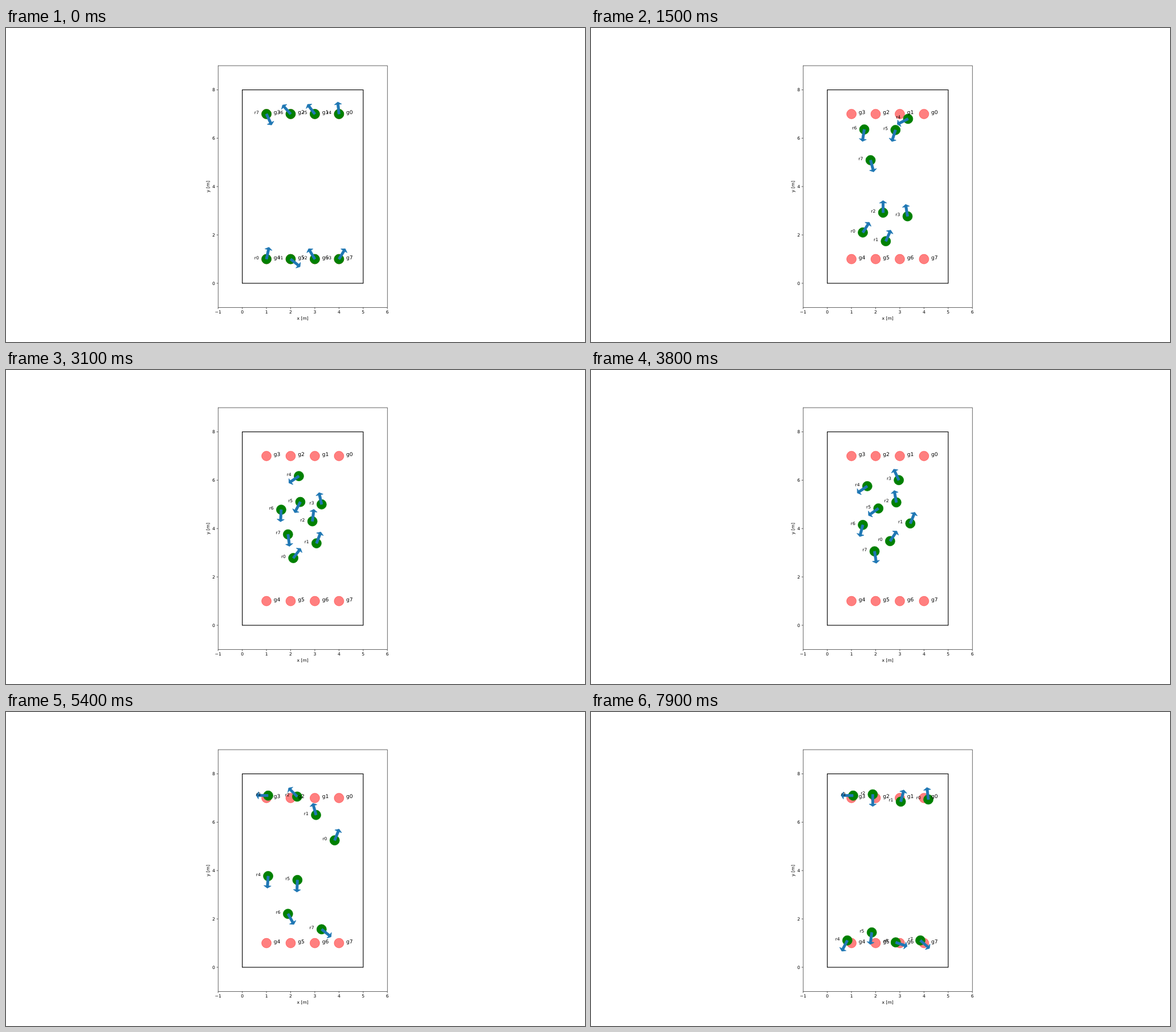
Animation, 1016 px wide and 551 px high, one loop 8 s. Source, as an HTML page:

```html
<!DOCTYPE html>
<html lang="en">
<head>
<meta charset="utf-8">
<title>Robot swap</title>
<style>
  html, body { margin: 0; width: 100%; height: 100%; overflow: hidden; background: #fff; }
  svg { display: block; width: 100%; height: 100%; }
  text { font: 7.63px "DejaVu Sans", sans-serif; text-rendering: geometricPrecision; }
  .goal { font-size: 9.15px; }
</style>
</head>
<body>
<svg id="stage" viewBox="0 0 1016 551"></svg>
<script>
const stage = document.getElementById('stage');
const UNIT = 42.43, RADIUS = 0.2 * UNIT, THIN = 0.61, EDGE = 0.76;
const STEP = 100, LOOP = 8000;
const px = x => 414.63 + UNIT * x;
const py = y => 447.96 - UNIT * y;
const rad = deg => deg * Math.PI / 180;
const ease = u => { u = Math.min(1, Math.max(0, u)); return u * u * (3 - 2 * u); };

function add(tag, attrs, parent = stage) {
  const el = document.createElementNS('http://www.w3.org/2000/svg', tag);
  for (const k in attrs) el.setAttribute(k, attrs[k]);
  return parent.appendChild(el);
}
function label(str, x, y, attrs = {}) {
  const el = add('text', { x, y, ...attrs });
  el.textContent = str;
  return el;
}
const line = (x1, y1, x2, y2) =>
  add('line', { x1, y1, x2, y2, stroke: '#000', 'stroke-width': THIN });
const box = (x0, y0, x1, y1, width) => add('rect', {
  x: px(x0), y: py(y1), width: UNIT * (x1 - x0), height: UNIT * (y1 - y0),
  fill: 'none', stroke: '#000', 'stroke-width': width
});

// Each robot: first and last heading in degrees, and waypoints in metres.
// The start and the goal places follow from the index.
const times = [0, 1500, 3100, 4400, 5400, 7900];
const CRUISE = 0.0012, TURN = 1000;
const home = i => i < 4 ? { x: 1 + i, y: 1 } : { x: 8 - i, y: 7 };
const robots = [
  { turn: [78, 97], via: [[1.47, 2.1], [2.11, 2.78], [3.07, 4.18], [3.82, 5.25], [4.18, 6.94]] },
  { turn: [-39, 75], via: [[2.42, 1.74], [3.07, 3.39], [3.61, 4.96], [3.05, 6.3], [3.04, 6.85]] },
  { turn: [121, 270], via: [[2.31, 2.92], [2.9, 4.3], [2.7, 5.81], [2.27, 7.06], [1.88, 7.15]] },
  { turn: [59, 179], via: [[3.32, 2.77], [3.28, 5], [2.48, 6.72], [1.07, 7.1]] },
  { turn: [96, 241], via: [[3.34, 6.8], [2.34, 6.17], [1.14, 5.24], [1.07, 3.77], [0.83, 1.11]] },
  { turn: [127, 263], via: [[2.82, 6.34], [2.4, 5.1], [1.95, 4.58], [2.28, 3.61], [1.84, 1.44]] },
  { turn: [132, 341], via: [[1.53, 6.36], [1.61, 4.78], [1.41, 3.56], [1.89, 2.21], [2.83, 1.03]] },
  { turn: [295, 319], via: [[1.79, 5.09], [1.89, 3.76], [2.16, 2.45], [3.28, 1.57], [3.85, 1.11]] }
];

// Velocity along a heading; none while the robot faces away from its path
function launch(knot, deg, p, q) {
  const dx = (q.x - p.x) / (q.t - p.t), dy = (q.y - p.y) / (q.t - p.t);
  const c = Math.cos(rad(deg)), s = Math.sin(rad(deg));
  const v = Math.max(0, dx * c + dy * s);
  knot.vx = v * c;
  knot.vy = v * s;
}

function plan({ turn, via }, i) {
  const knots = [{ t: 0, ...home(i) }, ...via.map(([x, y], n) => ({ t: times[n + 1], x, y }))];
  const [prev, end] = knots.slice(-2);
  end.t = Math.min(end.t, prev.t + Math.hypot(end.x - prev.x, end.y - prev.y) / CRUISE);
  for (let n = 1; n < knots.length - 1; n++) {
    const a = knots[n - 1], b = knots[n + 1];
    knots[n].vx = (b.x - a.x) / (b.t - a.t);
    knots[n].vy = (b.y - a.y) / (b.t - a.t);
  }
  launch(knots[0], turn[0], knots[0], knots[1]);
  launch(end, turn[1], prev, end);
  return knots;
}

function place(knots, t) {
  const n = knots.findIndex(k => k.t > t);
  if (n < 0) return knots[knots.length - 1];
  const p = knots[n - 1], q = knots[n], d = q.t - p.t, u = (t - p.t) / d;
  const curve = (a, b, va, vb) =>
    a + (b - a) * ease(u) + d * (va * u * (1 - u) ** 2 - vb * u * u * (1 - u));
  return { x: curve(p.x, q.x, p.vx, q.vx), y: curve(p.y, q.y, p.vy, q.vy) };
}

// Turn from one heading to another the short way round
const swing = (a, b, u) => a + ((((b - a) % 360) + 540) % 360 - 180) * ease(u);

function heading({ knots, turn }, t) {
  const stop = knots[knots.length - 1].t, s = Math.min(t, stop - 60);
  const p = place(knots, s), q = place(knots, s + 40);
  const course = Math.atan2(q.y - p.y, q.x - p.x) * 180 / Math.PI;
  return swing(swing(turn[0], course, t / TURN), turn[1], (t - stop) / TURN);
}

// Axes
box(-1, -1, 6, 9, THIN);
box(0, 0, 5, 8, 1.14);
const left = px(-1), bottom = py(-1), middle = { 'text-anchor': 'middle' };
for (let x = -1; x <= 6; x++) {
  line(px(x), bottom, px(x), bottom + 2.67);
  label(String(x).replace('-', '\u2212'), px(x), 501.3, middle);
}
for (let y = 0; y <= 8; y += 2) {
  line(left, py(y), left - 2.67, py(y));
  label(y, left - 5.34, py(y) + 2.9, { 'text-anchor': 'end' });
}
label('x [m]', px(2.5), 511.8, middle);
label('y [m]', 0, 0, { ...middle, transform: `translate(356.6 ${py(4)}) rotate(-90)` });

// Each goal is the home place mirrored through the centre
const goals = robots.map((_, i) => {
  const { x, y } = home(i);
  return [px(5 - x), py(8 - y)];
});
for (const [cx, cy] of goals)
  add('circle', { cx, cy, r: RADIUS, fill: '#f00', stroke: '#f00', 'stroke-width': EDGE,
    'fill-opacity': 0.5, 'stroke-opacity': 0.5 });

const arrowPath = [[0, 0.1], [0, -0.1], [0.8, -0.1], [0.8, -0.3], [1, 0], [0.8, 0.3], [0.8, 0.1]]
  .map(p => p.map(v => v * UNIT / 2).join()).join(' ');
robots.forEach((r, i) => {
  r.knots = plan(r, i);
  r.body = add('g', { 'stroke-width': EDGE });
  add('circle', { r: RADIUS, fill: '#008000', stroke: '#008000' }, r.body);
  r.arrow = add('polygon', { points: arrowPath, fill: '#1f77b4', stroke: '#1f77b4' }, r.body);
});
goals.forEach(([x, y], i) => label('g' + i, x + 0.3 * UNIT, y, { class: 'goal' }));
robots.forEach((r, i) => { r.name = label('r' + i, 0, 0); });

function draw(t) {
  for (const r of robots) {
    const at = place(r.knots, t), x = px(at.x), y = py(at.y);
    r.body.setAttribute('transform', `translate(${x} ${y})`);
    r.arrow.setAttribute('transform', `rotate(${-heading(r, t)})`);
    r.name.setAttribute('x', x - UNIT / 2);
    r.name.setAttribute('y', y);
  }
}
function tick() {
  draw(Math.floor(performance.now() % LOOP / STEP) * STEP);
  requestAnimationFrame(tick);
}
draw(0);
requestAnimationFrame(tick);
</script>
</body>
</html>
```
